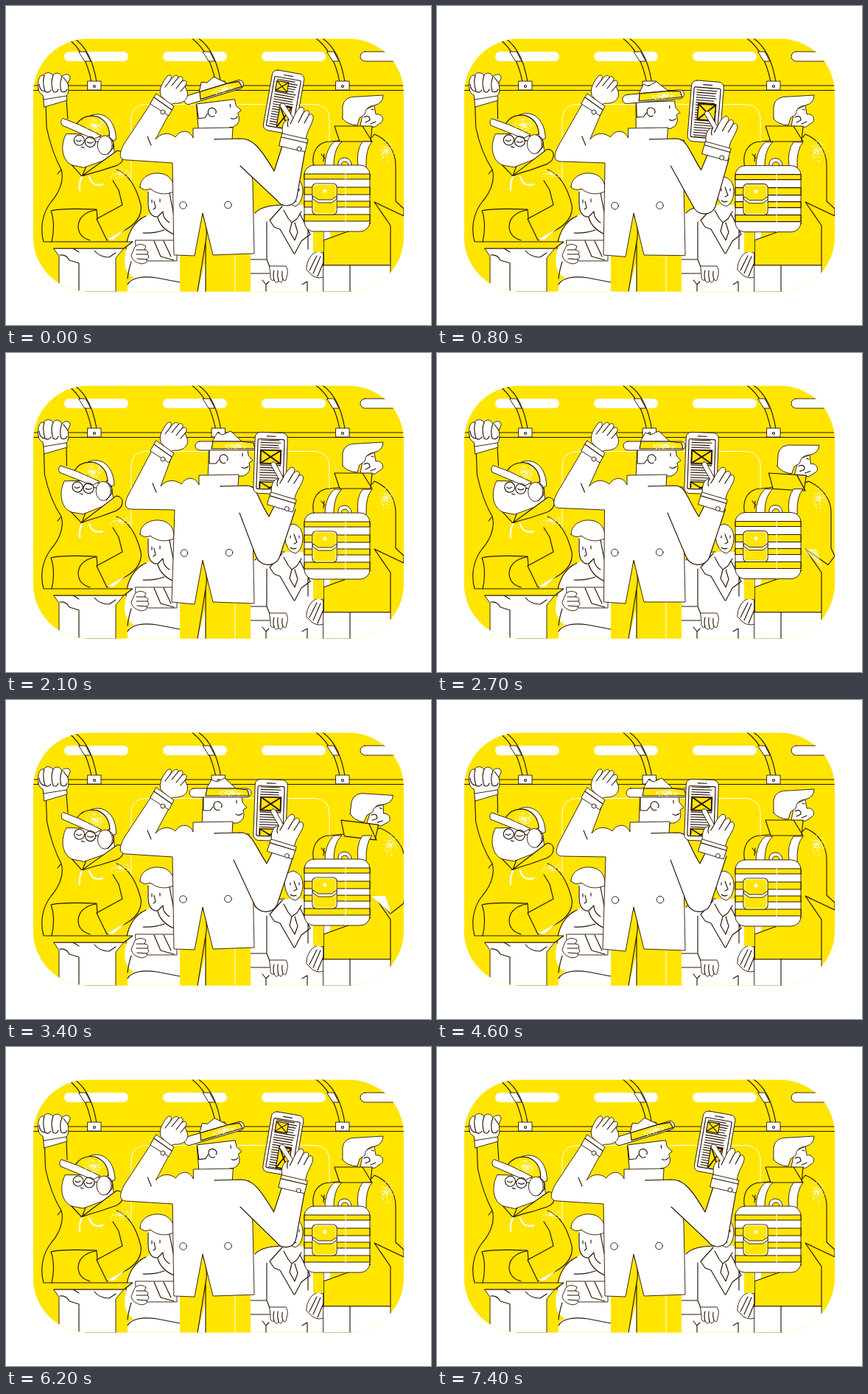
An HTML page for the animation above (7500 ms loop, 577 px wide and 433 px high).

```html
<!DOCTYPE html>
<html lang="en">
<head>
<meta charset="utf-8">
<title>Commuters</title>
<style>
  html, body { margin: 0; width: 100%; height: 100%; overflow: hidden; background: #fff; }
  svg { display: block; width: 100%; height: 100%; }
  path, rect, circle, ellipse { stroke: #2b1400; stroke-width: 1.15; stroke-linejoin: round; stroke-linecap: round; }
  .w { fill: #fff; stroke-width: .9; }
  .y { fill: #ffe500; }
  .l { fill: none; }
  .bare { stroke: none; }
  .thin { fill: none; stroke: #fff; stroke-width: 1; }
  .cord { fill: none; stroke: #fff; stroke-width: 2.4; }
  .dots { fill: none; stroke: #fff; stroke-width: 1.1; }
</style>
</head>
<body>
<svg viewBox="0 0 577 433">
  <defs>
    <clipPath id="frame"><rect x="37" y="44.500" width="503" height="343" rx="74"/></clipPath>
    <clipPath id="screen"><rect x="-17" y="-32" width="34" height="66" rx="2"/></clipPath>
  </defs>
  <g clip-path="url(#frame)">
    <rect class="y bare" x="37" y="44" width="503" height="344"/>
    <g id="carriage"></g>
    <path class="thin" d="M170 250V155Q170 133.500 192 133.500H417Q439 133.500 439 155V220"/>

    <g id="reader">
      <path class="w bare" d="M165 388V376Q168 371 174 369C158 360 160 343 164 328 166 309 174 292 188 286L200 280H240V388Z"/>
      <path class="w bare" d="M192 250V270Q194 287 206 286L214 280 228 290V250Z"/>
      <path class="w" d="M182 246C182 233 195 226 208 227 222 228 229 238 228 252L222 254C214 256 204 255 196 248Q188 252 182 246Z"/>
      <path class="l" d="M193 252V268C193 280 198 287 206 286L213 279M201 265L203 274L200 276M198 263V267M209 262V266M213 279Q213 289 222 294M222 254Q226 275 228 284M190 285C174 292 164 309 163 330M206 287Q210 302 228 310M186 308Q201 309 215 304"/>
      <path class="w" d="M176 318H232V346H193L177 339Z"/>
      <path class="l" d="M201 319L210 340 228 345M214 319L224 340"/>
      <path class="w" d="M175 327Q181 320 190 326L188 331Q195 332 192 337 196 341 191 344 193 349 184 350 172 348 170 339Z"/>
      <path class="l" d="M177 331L188 331M177 337L192 337M178 343L191 344M165 378C170 369 185 366 205 369L236 375M170 347Q166 360 165 370"/>
    </g>

    <g id="passenger">
      <path class="w bare" d="M330 388V286Q345 270 375 270H404L440 300V388Z"/>
      <path class="w" d="M378 250Q376 234 390 232 403 235 403 252 402 268 393 272 381 270 378 250Z"/>
      <path class="l" d="M391 246L395 257 391 259M386 248V251M398 248V251M386 264Q390 267 394 265"/>
      <path class="l" d="M338 281Q348 270 378 270M354 293V343M375 272L358 291 364 300 372 303 391 336M399 282L413 310 401 319 392 336M383 288L388 294 395 289M388 294L385 306 392 318 396 307 392 294M383 288L377 277M395 289L401 279M410 300V330M330 344H354L358 354M330 363H358M348 372L353 378V388M353 378L357 374M402 378L409 374V388"/>
      <path class="w" d="M358 353H380Q384 359 381 368 380 376 376 371 374 378 370 373 367 378 364 372 358 374 359 365Z"/>
      <path class="l" d="M364 372Q362 365 364 359M370 373Q368 366 369 359M376 371Q374 366 375 360"/>
      <path class="w" d="M409 349Q414 334 425 333L434 337V366Q426 372 416 366L408 358Z"/>
      <path class="l" d="M412 359L422 339M417 363L427 340M423 367L431 348"/>
    </g>

    <g id="hoodie">
      <path class="y bare" d="M37 220H76L150 222Q190 255 183 275L137 318 170 322 160 330V388H37Z"/>
      <path class="w" d="M65 329H160L149 342V388H72V340Z"/>
      <path class="l" d="M73 338Q82 337 86 345L99 349V388M99 334L91 329M120 332Q127 341 140 341L149 335"/>
      <path class="y" d="M52 320H172L160 329H65"/>
      <path class="l" id="raisedArm"/>
      <path class="l" d="M61 278Q75 274 123 276L124 289M61 278C66 291 65 309 62 320M122 277C104 280 98 290 98 300Q99 314 114 318M123 289L158 270 153 250 145 237M123 289L137 318 165 302C180 293 185 280 183 270 177 246 166 228 150 222"/>
      <path class="w bare" d="M137 317L163 302 146 317Z"/>
      <path class="w" d="M51 123L82 119 83 128 52 137Z"/>
      <path class="w" d="M44 113C42 100 46 93 51 94 54 89 61 90 64 94 67 89 74 91 76 96 80 91 88 92 87 98L84 105 85 114Q84 121 82 122L51 127 50 121Q45 119 44 113Z"/>
      <path class="l" d="M52 94Q49 104 53 116 58 119 61 114M64 94Q60 104 64 116 69 119 71 113M76 96Q72 105 75 116 81 118 83 113M45 106Q46 116 53 116M78 97L84 105"/>
      <g id="listener">
        <path class="w" d="M80 174C72 190 75 210 89 216L105 219 147 203 143 174Z"/>
        <path class="y" d="M102 231L150 195C161 195 162 209 150 215L127 223Q112 227 102 231Z"/>
        <path class="l" d="M89 216L103 231M103 231L108 218"/>
        <path class="w" d="M113 148C130 141 147 153 148 180L139 184Q141 160 124 150Z"/>
        <path class="y" d="M94 160Q103 146 121 149 138 155 139 174L130 179Z"/>
        <path class="w" d="M75 153Q71 156 74 162L118 180 128 175 98 161Z"/>
        <circle class="l" cx="98" cy="182" r="7"/><circle class="l" cx="113" cy="184" r="7"/>
        <path class="l" d="M94 182Q97 185 101 182M109 184Q113 187 117 184M120 183L126 184M101 191L105 192"/>
        <ellipse class="w" cx="133" cy="188" rx="10" ry="13"/>
        <path class="l" d="M139 177Q147 182 144 192L137 200"/>
        <path class="dots" id="capDots"/>
      </g>
      <path class="cord" d="M103 232Q99 240 100 250M113 232Q117 246 131 242"/>
      <path class="dots" id="hoodDots"/>
    </g>

    <g id="traveller">
      <path class="y" id="longCoat"/>
      <path class="w" d="M431 352H522V388H431Z"/>
      <path class="l" d="M467 352V388M431 306V352M428 201L433 207M431 211L432 201"/>
      <path class="y bare" d="M417 306H431V334H417Z"/>
      <path class="w bare" id="gap" d="M496 266H515L523 290Z"/>
      <g id="glance">
        <path class="w" d="M481 163L485 142 500 135 502 147C511 145 515 156 508 159L501 164Z"/>
        <path class="w" d="M457 153V136Q459 122 478 123L512 121Q512 132 500 135 488 136 487 147L480 152 477 162Q463 161 457 153Z"/>
        <path class="l" d="M486 151Q494 147 494 155L488 158M496 140L499 141M495 160L502 157"/>
        <path class="y" d="M446 163H497L495 184H453Z"/>
        <path class="l" d="M484 163L497 184"/>
      </g>
      <path class="dots" id="coatDots"/>
      <g id="backpack"></g>
    </g>

    <g id="coatMan">
      <path class="y bare" d="M236 335L266 270 332 335V388H236Z"/>
      <path class="w bare" d="M271 345V388H260Z"/>
      <path class="l" d="M267 283Q275 303 271 320L260 388M271 320V388"/>
      <path class="thin" d="M311 338V388"/>
      <g id="face">
        <path class="w" d="M268 130H320L321 139 327 146 322 149Q326 163 314 167H308L306 182H266Z"/>
        <path class="l" d="M268 132V150H277L281 145M290 149C282 153 279 139 286 138 291 137 295 143 292 146M313 136V140M312 155Q317 158 321 154"/>
      </g>
      <g id="hat">
        <path class="w" d="M271 122L279 108 286 111 297 106 311 119V125H271Z"/>
        <rect class="w" x="249" y="120" width="84" height="12" rx="6"/>
        <path class="y" d="M273 120H311L328 122 330 130H271Z"/>
        <path class="dots" id="hatDots"/>
      </g>
      <path class="w" id="coat"/>
      <path class="l" id="coatLines"/>
      <circle class="w" id="buttonLeft" r="4.800"/><circle class="w" id="buttonRight" r="4.800"/>
      <path class="w" d="M210 121C207 112 213 103 219 95 224 92 226 95 223 101 228 94 233 92 234 97 238 94 242 97 239 102 245 99 247 104 243 109L246 116C249 127 239 133 229 132L222 134Z"/>
      <path class="l" d="M223 101L216 110M234 97L225 108M239 102L231 112M243 109L237 116"/>
      <path class="w" d="M204 119L228 136 221 149 196 133Z"/>
      <path class="l" d="M201 124L225 141"/>
      <circle class="w" cx="213" cy="144" r="3"/>
      <path class="w bare" id="armFill"/>
      <path class="l" id="armLine"/>
      <g id="phone"></g>
      <g id="hand">
        <path class="w" d="M376 177C373 163 377 155 384 154L372 136C372 130 378 131 380 136L390 152C394 143 399 135 403 138 407 140 403 146 402 148 407 139 413 141 411 148 417 144 419 151 415 159 412 167 408 171 407 183Z"/>
        <path class="l" d="M390 152L386 160M402 148L397 158M411 148L405 159M384 154Q381 159 383 164"/>
        <path class="w" d="M375 173L410 181 406 198 371 190Z"/>
        <path class="l" d="M374 178L409 186"/>
        <circle class="w" cx="398" cy="194" r="3"/>
      </g>
    </g>
  </g>
</svg>
<script>
const LOOP = 7500, STEP = 100;
const $ = id => document.getElementById(id);
const set = (id, name, value) => $(id).setAttribute(name, value);
const path = (cls, d) => `<path class="${cls}" d="${d}"/>`;
const rect = (cls, x, y, w, h, r = 0) =>
  `<rect class="${cls}" x="${x}" y="${y}" width="${w}" height="${h}" rx="${r}"/>`;
const mix = (a, b, k) => a + (b - a) * k;
const ease = (t, from, to) => {
  const u = Math.min(1, Math.max(0, (t - from) / (to - from)));
  return u * u * (3 - 2 * u);
};

function drawCarriage() {
  let art = path('l', 'M37 108H540M37 114.5H540');
  for (let i = 0; i < 4; i++) art += rect(i < 3 ? 'w bare' : 'w', 79 + 134 * i, 62, 87, 13, 6.5);
  for (let i = 0; i < 3; i++) {
    const x = 84 + 168.5 * i;
    art += `<g transform="translate(${x})">`
      + path('y', 'M0 44Q24 62 32 103H39Q32 60 9 44')
      + path('w', 'M15 62H24L31 75H23Z')
      + rect('w', 27, 102, 18, 12)
      + '<circle class="l" cx="36" cy="109" r="1.5"/></g>';
  }
  $('carriage').innerHTML = art;
}

function drawBackpack() {
  let art = path('w', 'M433 218C433 200 440 188 446 184H456C447 192 445 205 445 218ZM478 218Q475 196 484 184H497Q488 194 489 218Z')
    + path('w', 'M451 217V213Q452 206 460 206 469 207 469 217H465Q465 211 460 211 455 211 455 217Z')
    + rect('w', 405, 216, 89, 90, 13);
  for (const [y, h] of [[228, 7], [246, 10], [265, 8], [283, 9]]) art += rect('y', 405, y, 89, h);
  art += rect('y', 416, 241, 33, 42, 5)
    + rect('thin', 417, 242, 31, 40, 4)
    + path('w', 'M417 258L424 263H442L449 258V262L442 267H424L417 262Z')
    + '<circle class="w bare" cx="433" cy="251" r="2.5"/>'
    + path('thin', 'M461 217V306');
  $('backpack').innerHTML = art;
}

function drawPhone() {
  let rows = '';
  for (let y = -40; y < 70; y += 3.4) rows += `M-14 ${y}H${14 - Math.abs(Math.round(y * 7)) % 5}`;
  const picture = id => `<g id="${id}">` + rect('y', -8, -6, 16, 12) + path('l', 'M-8 -6L8 6M8 -6L-8 6') + '</g>';
  $('phone').innerHTML = rect('w', -22, -42, 44, 83, 7) + rect('l', -18, -33, 36, 68, 2)
    + path('l', 'M-6 -37H6')
    + '<g clip-path="url(#screen)"><g id="page">' + path('l', rows)
    + picture('pictureTop') + picture('pictureMid') + picture('pictureLow') + '</g></g>';
}

// Soft shading: seeded dots, denser towards the middle
function scatter(id, cx, cy, rx, ry, count) {
  let seed = cx * 31 + cy, d = '';
  const random = () => (seed = (seed * 16807) % 2147483647) / 2147483647;
  for (let i = 0; i < count; i++) {
    const a = random() * Math.PI * 2, r = random();
    d += `M${(cx + Math.cos(a) * r * rx).toFixed(1)} ${(cy + Math.sin(a) * r * ry).toFixed(1)}h.1`;
  }
  set(id, 'd', d);
}

function poseCoat(lean, look) {
  const top = 8 * lean, arm = 7 * lean, drop = 3 * lean;
  set('coat', 'd', `M204 121L${161 + arm} ${186 + drop}C${152 + arm} ${202 + drop} ${154 + arm} ${209 + drop} ${164 + arm} ${209 + drop}
    L${226 + 3 * lean} 213L${228 - 3 * lean} 338L256 ${339 + 2 * lean}L267 281L281 338L337 ${336 + 4 * lean}
    L335 240L${330 + top} 182L${307 + top} 181L${308 + top} 165L${254 + top} 166L${254 + top} 179
    C${249 + top} 167 ${236 + top} 168 ${230 + top} 178C${222 + arm} 171 ${210 + arm} 172 ${203 + arm} 181L226 138Z`);
  set('coatLines', 'd', `M${192 + arm} 177L${197 + arm} 189M${283 + top} 181H${308 + top}`);
  for (const [id, x, y] of [['buttonLeft', 240.5, 270.5], ['buttonRight', 301.5, 270]]) {
    set(id, 'cx', x + 1.5 * lean);
    set(id, 'cy', y + lean);
  }

  const shift = 3 * lean * look;
  const at = (ax, ay, bx, by) => `${mix(ax, bx, look) + shift} ${mix(ay, by, look)}`;
  const start = `${318 - 9 * look + top} 217`;
  const elbow = at(368, 264, 336, 275), under = at(374, 274, 342, 291);
  const bend = at(392, 274, 362, 291), back = at(395, 259, 368, 278);
  const inner = at(375, 190, 363, 204), outer = at(406, 196, 390, 212);
  const upper = `M${283 + top} 181L${318 + top} 180C${334 + top} 180 ${at(344, 190, 336, 194)} ${at(364, 224, 354, 222)}L${inner}`;
  set('armFill', 'd', `${upper}L${outer}L${back}C${bend} ${under} ${elbow}L${start}Z`);
  set('armLine', 'd', `${upper}M${start}L${elbow}C${under} ${bend} ${back}L${outer}`);
}

function draw(ms) {
  const t = ms / 1000;
  const look = ease(t, .3, 1.1) - ease(t, 5.5, 6.3);
  const jolt = ease(t, 2.4, 3) - ease(t, 3.8, 4.4);
  const lean = look * (1 - jolt);
  const sway = Math.cos(2 * Math.PI * (t / 3.75 - .9));

  poseCoat(lean, look);
  const headX = mix(-9, 0, look) + 8 * lean;
  set('face', 'transform', `translate(${headX + 4 * (1 - look)}) rotate(${-7 * (1 - look)} 290 166)`);
  set('hat', 'transform', `translate(${headX} ${mix(-9, 0, look)}) rotate(${-17 * (1 - look)} 291 126)`);
  set('phone', 'transform', `translate(${mix(377, 359, look)} ${mix(131, 150, look)}) rotate(${mix(10, 2, look)})`);
  set('hand', 'transform', `translate(${-16 * look} ${17 * look}) rotate(${4 * look} 391 186)`);
  set('page', 'transform', `translate(0 ${-29 * look})`);
  const wide = mix(1, 1.7, look);
  set('pictureTop', 'transform', `translate(${-6 * (1 - look)} -21) scale(${wide} 1.1)`);
  set('pictureMid', 'transform', `translate(${4 * (1 - look)} 20) scale(${wide} ${mix(2.5, 1.5, look)})`);
  set('pictureLow', 'transform', `translate(0 62) scale(${wide} 1.3)`);

  const x = 52.5 + 2 * sway;
  set('raisedArm', 'd', `M${x} 136L${x + 1} 165Q${x + 8} 198 75 222C80 238 70 256 62 265 49 281 46 302 51 320M82 127L${83 + sway} 153M75 222L70 228`);
  set('listener', 'transform', `translate(${.8 * sway} ${.6 * sway}) rotate(${1.5 * sway} 110 215)`);

  const side = 12 * jolt;
  set('longCoat', 'd', `M418 220C413 196 425 184 440 184L497 178 ${500 + 8 * jolt} 174C${520 + 8 * jolt} 182 ${529 + side} 200 ${529 + side} 216V265L540 ${275 + jolt}L${540 - 18 * jolt} ${285 + 5 * jolt}L500 266L522 298V352H431V318L495 295`);
  set('gap', 'opacity', jolt);
  set('glance', 'transform', `translate(${8 * jolt} ${3 * jolt}) rotate(${7 * jolt} 470 170)`);
  set('coatDots', 'transform', `translate(${5 * jolt})`);
  set('backpack', 'transform', `translate(0 ${lean})`);
}

drawCarriage();
drawBackpack();
drawPhone();
scatter('capDots', 119, 162, 13, 11, 130);
scatter('hoodDots', 155, 228, 15, 7, 70);
scatter('hatDots', 305, 126, 17, 5, 110);
scatter('coatDots', 517, 197, 10, 15, 100);

const begin = performance.now();
function tick() {
  const ms = (performance.now() - begin) % LOOP;
  draw(Math.floor(ms / STEP) * STEP);
  requestAnimationFrame(tick);
}
tick();
</script>
</body>
</html>
```
